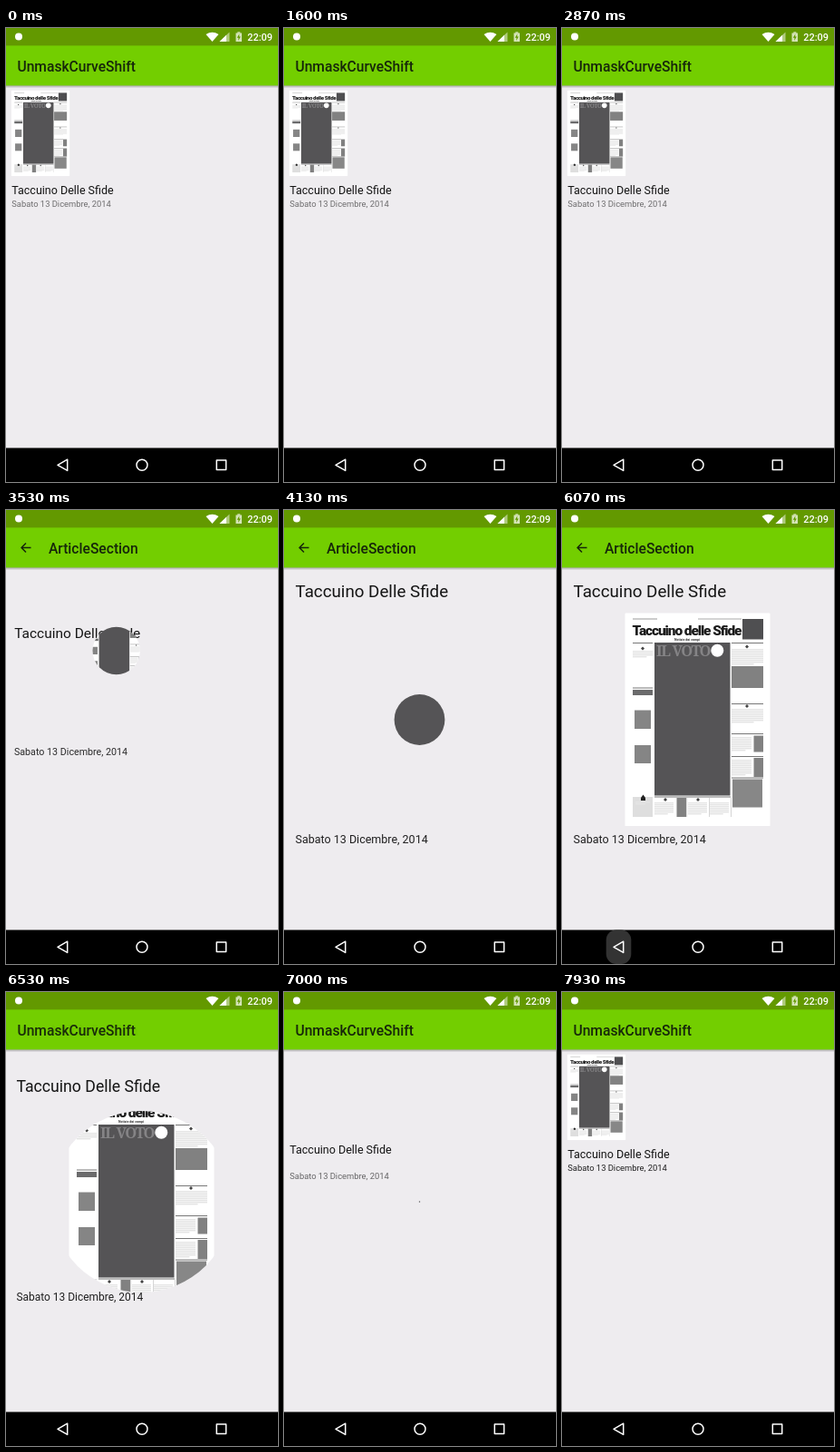
An HTML page with a canvas for the animation above (8000 ms loop, 300 by 500 pixels).

```html
<!DOCTYPE html>
<html lang="it">
<head>
<meta charset="utf-8">
<title>Reveal along an arc</title>
<style>
  html, body { margin: 0; width: 100%; height: 100%; overflow: hidden; background: #eeecef; }
  canvas { display: block; width: 300px; height: 500px; }
</style>
</head>
<body>
<canvas id="stage"></canvas>
<script>
const LOOP = 8000;
const canvas = document.getElementById('stage');
const ctx = canvas.getContext('2d');
const ratio = window.devicePixelRatio || 1;
canvas.width = 300 * ratio;
canvas.height = 500 * ratio;

const THUMB = { x: 38, y: 116, scale: 0.402, radius: 57 };
const COVER = { x: 149.5, y: 231, scale: 1, radius: 142 };

const lerp = (a, b, p) => a + (b - a) * p;
const span = (t, start, length) => Math.min(1, Math.max(0, (t - start) / length));
const ease = p => (1 - Math.cos(Math.PI * p)) / 2;

function rect(x, y, w, h, color) {
  ctx.fillStyle = color;
  ctx.fillRect(x, y, w, h);
}

function disc(x, y, r, color) {
  ctx.fillStyle = color;
  ctx.beginPath();
  ctx.arc(x, y, r, 0, 2 * Math.PI);
  ctx.fill();
}

function shape(points, color) {
  ctx.fillStyle = color;
  ctx.beginPath();
  points.forEach(([x, y]) => ctx.lineTo(x, y));
  ctx.closePath();
  ctx.fill();
}

function text(string, x, y, font, color, align = 'left', spacing = 0) {
  ctx.font = font;
  ctx.fillStyle = color;
  ctx.textAlign = align;
  ctx.letterSpacing = `${spacing}px`;
  ctx.fillText(string, x, y);
}

const roboto = (size, weight = 400) => `${weight} ${size}px Roboto, sans-serif`;

function withAlpha(alpha, draw) {
  ctx.save();
  ctx.globalAlpha = alpha;
  draw();
  ctx.restore();
}

// Newspaper page

function column(x, y, w, h) {
  for (let row = 0; row < h; row += 2) rect(x, y + row, row + 2 >= h ? w * 0.7 : w, 1.4, '#e4e4e4');
}

function rule(x, y, w) {
  rect(x, y, w, 1, '#777');
}

function diamond(x, y) {
  shape([[x - 2, y], [x, y - 2], [x + 2, y], [x, y + 2]], '#444');
}

function drawPage() {
  rect(69.5, 113.5, 160, 234.5, '#fff');

  rect(78, 119.5, 27, 1, '#999');
  rect(150, 119.5, 48, 1, '#aaa');
  text('Taccuino delle Sfide', 77.5, 138, roboto(15.5, 900), '#1c1c1c', 'left', -1.1);
  text('Notizie dai campi', 138, 143.5, roboto(3.6, 700), '#333', 'center');
  rect(199, 120, 23, 22.5, '#4f4f51');

  rect(102, 146, 83.5, 168.5, '#555456');
  text('IL VOTO', 104, 161, '900 16.5px "Noto Serif", serif', '#858486', 'left', -1.4);
  disc(171.3, 154.8, 7, '#fff');

  rule(78, 146, 22);
  diamond(89, 152.5);
  column(78, 155, 22, 8);
  rule(78, 195.5, 22);
  rect(78, 198, 22, 6, '#6b6b6c');
  rect(80, 220.5, 18, 20.5, '#858585');
  rect(80, 259, 18, 20, '#858585');
  rect(78, 316, 22, 22, '#dedede');
  shape([[87, 320], [87, 317], [89.5, 313.5], [92, 317], [92, 320]], '#222');
  column(81, 321, 16, 3);

  rule(187, 146, 35);
  diamond(204, 150.5);
  column(187, 153, 35, 18);
  rect(187, 172, 35, 24, '#818181');
  rule(187, 213, 35);
  diamond(204, 216);
  column(187, 219, 35, 15);
  rule(187, 246, 35);
  column(187, 250, 22, 16);
  rect(211.5, 248.5, 10.5, 18, '#818181');
  rule(187, 271, 35);
  column(187, 275, 22, 18);
  rect(211.5, 273, 10.5, 21, '#818181');
  rule(187, 294.5, 35);
  rect(188, 296.5, 33, 31, '#878787');

  rule(102, 315.5, 84);
  for (const x of [102, 139, 163]) column(x, 322, 21, 13);
  for (const x of [114, 150]) diamond(x, 319);
  rect(126.5, 317, 10.5, 21, '#818181');
  for (const x of [137.6, 162, 186]) rect(x, 317, 0.5, 21, '#aaa');
}

function drawReveal({ x, y, scale, radius }) {
  if (radius <= 0) return;
  ctx.save();
  ctx.beginPath();
  ctx.arc(x, y, radius, 0, 2 * Math.PI);
  ctx.clip();
  ctx.translate(x, y);
  ctx.scale(scale, scale);
  ctx.translate(-COVER.x, -COVER.y);
  drawPage();
  ctx.restore();
}

// Quarter ellipse that sets off horizontally
function arcPoint(from, to, p) {
  const angle = p * Math.PI / 2;
  return {
    x: lerp(from.x, to.x, Math.sin(angle)),
    y: lerp(from.y, to.y, 1 - Math.cos(angle))
  };
}

function pageState(t) {
  if (t < 3900) {
    const p = ease(span(t, 3122, 778));
    return { ...THUMB, ...arcPoint(THUMB, COVER, p), radius: THUMB.radius * (1 - p) };
  }
  if (t < 7050) {
    const size = ease(span(t, 3900, 790)) - ease(span(t, 6238, 800));
    return { ...COVER, radius: COVER.radius * size };
  }
  const p = ease(span(t, 7070, 800));
  return { ...THUMB, ...arcPoint(COVER, THUMB, p), radius: THUMB.radius * p };
}

// Screen furniture

function drawStatusBar() {
  rect(0, 0, 300, 19.4, '#639900');
  disc(14, 9.5, 4, '#fff');
  ctx.fillStyle = '#fff';
  ctx.beginPath();
  ctx.moveTo(227.5, 15);
  ctx.lineTo(220.5, 7);
  ctx.quadraticCurveTo(227.5, 2.5, 234.5, 7);
  ctx.fill();
  shape([[235.5, 15], [246.5, 15], [246.5, 4.5]], '#b1cc80');
  shape([[235.5, 15], [243, 15], [243, 7.8]], '#fff');
  rect(253.5, 5.5, 6.5, 9.5, '#d5e4b8');
  rect(255.3, 4.3, 3, 1.5, '#d5e4b8');
  shape([[257.3, 6.5], [254.8, 10.8], [256.5, 10.8], [256.2, 14], [258.8, 9.6], [257.2, 9.6]], '#639900');
  text('22:09', 294, 13.7, roboto(10.94, 500), '#fff', 'right');
}

function drawActionBar(detail) {
  const shadow = ctx.createLinearGradient(0, 63.4, 0, 66.5);
  shadow.addColorStop(0, 'rgba(0,0,0,.28)');
  shadow.addColorStop(1, 'rgba(0,0,0,0)');
  rect(0, 63, 300, 3.5, shadow);
  rect(0, 19, 300, 44.4, '#73ce00');

  const ink = '#16260a';
  const font = roboto(15.625, 500);
  withAlpha(1 - detail, () => text('UnmaskCurveShift', 12.5, 47.7, font, ink));
  withAlpha(detail, () => {
    text('ArticleSection', 46.9, 47.7, font, ink);
    ctx.strokeStyle = ink;
    ctx.lineWidth = 1.5;
    ctx.stroke(new Path2D('M27.5 41.5H17M22 36.5L17 41.5L22 46.5'));
  });
}

function drawNavigation(t) {
  rect(0, 462.5, 300, 37.5, '#000');
  if (t >= 6070) {
    withAlpha(1 - span(t, 6130, 270), () => {
      ctx.fillStyle = '#333';
      ctx.beginPath();
      ctx.roundRect(48.7, 462.5, 27.6, 37.5, 11);
      ctx.fill();
    });
  }
  ctx.strokeStyle = '#fff';
  ctx.lineWidth = 1.5;
  ctx.lineJoin = 'round';
  ctx.stroke(new Path2D('M57 481.3L67.7 475.2V487.4Z'));
  ctx.beginPath();
  ctx.arc(150, 481.2, 6, 0, 2 * Math.PI);
  ctx.stroke();
  ctx.strokeRect(232.3, 476, 10.4, 10.4);
}

// Labels travel between list and detail; the type reaches list size slightly early
function labelState(t, start) {
  const p = ease(span(t, start, 800)) - ease(span(t, 6320, 800));
  const grow = t < 6320 ? p : Math.max(0, (p - 0.06) / 0.94);
  return { p, grow, x: lerp(6.25, 12.5, grow) };
}

function drawLabels(t) {
  const title = labelState(t, 3143);
  text('Taccuino Delle Sfide', title.x, lerp(182.8, 96, title.p),
    roboto(lerp(12.5, 18.75, title.grow)), '#151515');

  const date = labelState(t, 3168);
  const alpha = t >= 7900 ? 0.87 : lerp(0.54, 0.87, Math.min(1, 2 * date.p));
  text('Sabato 13 Dicembre, 2014', date.x, lerp(196.6, 367.2, date.p),
    roboto(lerp(9.375, 12.5, date.grow)), `rgba(0,0,0,${alpha})`);
}

function render(t) {
  ctx.setTransform(ratio, 0, 0, ratio, 0, 0);
  rect(0, 0, 300, 500, '#eeecef');
  drawLabels(t);
  drawReveal(pageState(t));
  drawActionBar(span(t, 3130, 300) - span(t, 6240, 300));
  drawStatusBar();
  drawNavigation(t);
}

const begin = performance.now();
function tick() {
  render((performance.now() - begin) % LOOP);
  requestAnimationFrame(tick);
}
tick();
</script>
</body>
</html>
```
